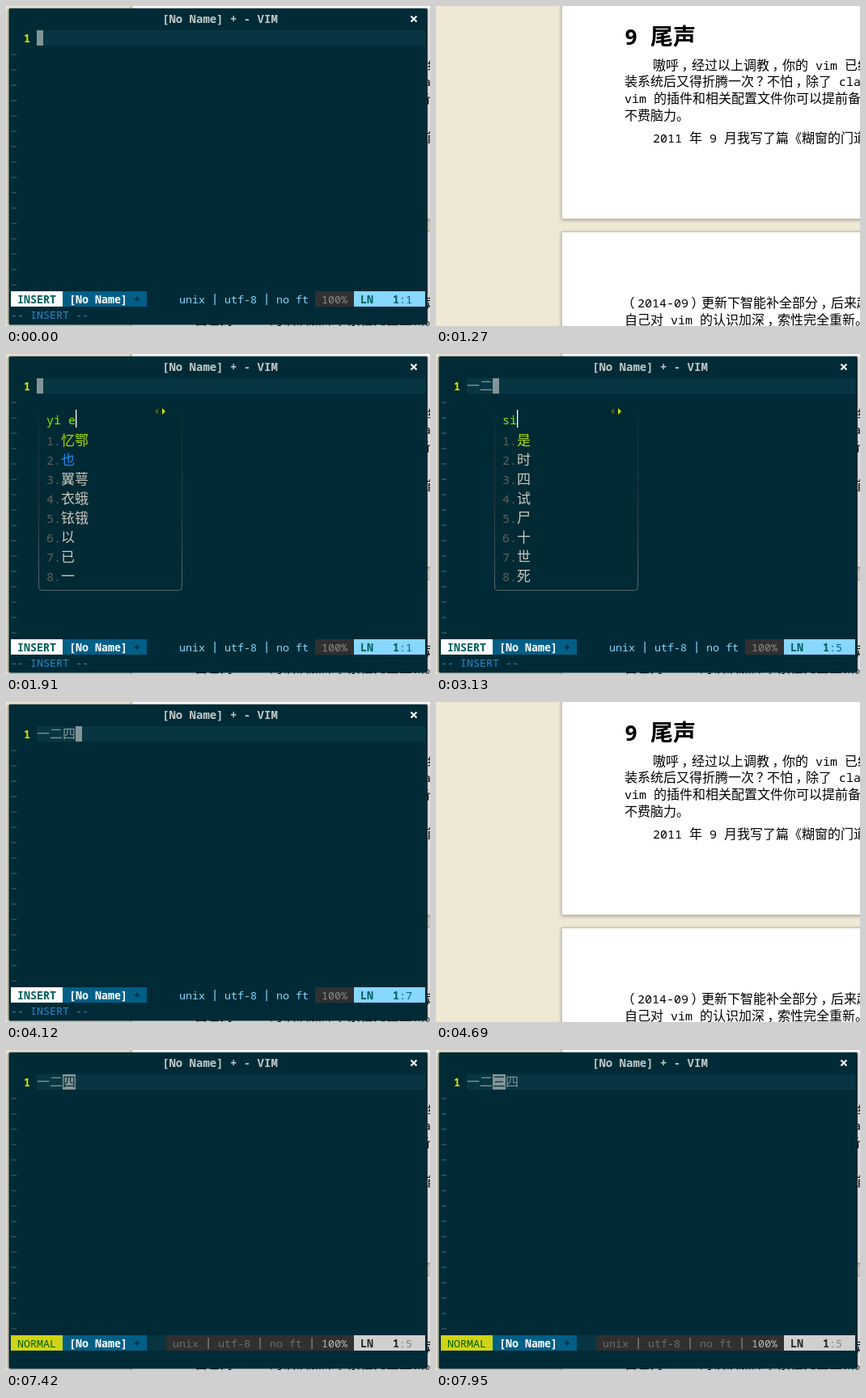
These frames come from a looping animation (524x396 px, 8000 ms). An HTML page:

```html
<!DOCTYPE html>
<html lang="zh-CN">
<head>
<meta charset="utf-8">
<title>Vim input</title>
<style>
html, body { margin: 0; width: 100%; height: 100%; overflow: hidden; background: #eee8d5; }
svg { display: block; width: 524px; height: 396px; }
text { white-space: pre; font-family: "Noto Sans Mono", "Noto Sans CJK SC", "Noto Sans CJK JP", monospace; }
.han { font-family: "Noto Sans CJK SC", "Noto Sans CJK", "Noto Sans CJK JP", sans-serif; }
</style>
</head>
<body>
<svg viewBox="0 0 524 396">
  <defs>
    <linearGradient id="edge" x1="0" y1="0" x2="0" y2="1">
      <stop offset="0" stop-color="#4b5f64" stop-opacity="0"/>
      <stop offset=".5" stop-color="#33383c" stop-opacity=".8"/>
      <stop offset="1" stop-color="#586b70"/>
    </linearGradient>
    <filter id="shade" x="-5%" y="-5%" width="110%" height="110%">
      <feDropShadow dx="0" dy="1" stdDeviation="2" flood-color="#000" flood-opacity=".3"/>
    </filter>
  </defs>
  <g id="page"></g>
  <g id="editor"></g>
</svg>
<script>
const LOOP = 8000, CELL = 8, ROW = 19, LEFT = 6, TOP = 30, TEXT_X = 38;
const BG = '#002b36', LINE = '#073642', GREY = '#839496';
const page = document.getElementById('page');
const editor = document.getElementById('editor');

const rect = (x, y, w, h, fill, more = '') =>
  `<rect x="${x}" y="${y}" width="${w}" height="${h}" fill="${fill}" ${more}/>`;

// Punctuation sits nearer the middle of its cell; offsets in em.
const NUDGE = { '，': 0.22, '？': 0.2, '（': -0.22, '）': 0.22 };

// Latin runs advance 0.6 em, Chinese runs one em.
function write(x, y, str, fill, mono, han = 16, bold = false) {
  let out = '';
  for (const run of str.match(/[\x20-\x7e]+|[，？（）]|[^\x20-\x7e，？（）]+/g) || []) {
    const wide = run.charCodeAt(0) > 126;
    const size = wide ? han : mono;
    const left = x + (NUDGE[run] || 0) * size;
    out += `<text x="${left}" y="${y}" fill="${fill}" font-size="${size}"` +
      `${wide ? ' class="han"' : ''}${bold ? ' font-weight="700"' : ''}>${run}</text>`;
    x += run.length * size * (wide ? 1 : 0.6);
  }
  return out;
}

const term = (x, y, str, fill, bold) => write(x, y, str, fill, CELL / 0.6, 16, bold);

function drawPage() {
  const sheet = (y, h) =>
    rect(155.5, y, 380, h, '#fff', 'stroke="#cdbfa6" filter="url(#shade)"');
  const lines = [
    [268, 79, '嗷呼，经过以上调教，你的 vim 已经'],
    [233, 99, '装系统后又得折腾一次？不怕，除了 clang'],
    [233, 120, 'vim 的插件和相关配置文件你可以提前备份'],
    [233, 141, '不费脑力。'],
    [268, 169, '2011 年 9 月我写了篇《糊窗的门道》'],
    [233, 373, '（2014-09）更新下智能补全部分，后来起'],
    [233, 394, '自己对 vim 的认识加深，索性完全重新。']
  ];
  page.innerHTML = rect(0, 0, 524, 396, '#eee8d5') +
    sheet(-10.5, 274) + sheet(279.5, 130) +
    write(233, 48, '9 尾声', '#000', 26.67, 28, true) +
    lines.map(([x, y, s]) => write(x, y, s, '#000', 15)).join('');
}

function drawFrame() {
  let out = rect(2.5, 3, 519.5, 392, 'none', 'rx="3" stroke="#000" stroke-opacity=".18" stroke-width="3"') +
    rect(3.5, 3, 517.5, 391.5, BG, 'rx="2"') +
    write(193, 21, '[No Name] + - VIM', '#c0c9c9', 14, 14, true) +
    '<path d="M500.5 12.5l7 7m0-7l-7 7" stroke="#f2f4f4" stroke-width="2.2"/>' +
    rect(TEXT_X, TOP, 480, ROW, LINE) +
    term(22, TOP + 15, '1', '#d7e000', true);
  for (let i = 1; i <= 16; i++) out += term(LEFT, TOP + i * ROW + 16, '~', '#586e75');
  return out;
}

function drawStatus(insert, col) {
  const y = TOP + 17 * ROW, base = y + 15;
  const info = insert ? '#87d7ff' : '#6c6c6c';
  const start = insert ? 214 : 206;
  const bar = x => rect(x + 3.5, y + 3, 1.2, 14, insert ? info : '#8a8a8a');
  let out = rect(LEFT, y, 512, ROW, LINE) +
    rect(LEFT, y, 64, ROW, insert ? '#fff' : '#d0d414') +
    term(14, base, insert ? 'INSERT' : 'NORMAL', insert ? '#005f5f' : '#005f00', insert) +
    rect(70, y, 104, ROW, '#005f87') +
    term(78, base, '[No Name]', '#fff', true) +
    term(158, base, '+', BG, true) +
    (insert ? rect(174, y, 208, ROW, BG) : rect(198, y, 184, ROW, '#303030')) +
    rect(382, y, 48, ROW, '#303030') +
    term(start, base, 'unix', info) + bar(start + 40) +
    term(start + 56, base, 'utf-8', info) + bar(start + 104) +
    term(start + 120, base, 'no ft', info) +
    term(390, base, '100%', insert ? '#8a8a8a' : '#b8b8b8') +
    rect(430, y, 88, ROW, insert ? '#87d7ff' : '#d0d0d0') +
    term(438, base, 'LN', insert ? '#005f5f' : '#262626', true) +
    term(478, base, '1', insert ? '#005f5f' : '#262626', true) +
    term(486, base, ':' + col, insert ? '#005f87' : '#808080');
  if (insert) out += term(LEFT, base + ROW, '-- INSERT --', '#268bd2');
  else out += bar(374);
  return out;
}

function drawPopup(x, typed, words, blue) {
  const caret = x + 12 + typed.length * 9;
  let out = rect(x + 2.5, 59.5, 177, 233, '#022a34', 'rx="4" stroke="url(#edge)"') +
    `<path d="M${x + 150} 67.5v7l-4-3.5z" fill="#5b6208"/>` +
    `<path d="M${x + 155} 67v8l4-4z" fill="#d8e000"/>` +
    write(x + 12, 87, typed, '#80f000', 15) +
    rect(caret, 69, 1.3, 22, '#fff');
  words.split(' ').forEach((word, i) => {
    const y = 113 + i * 24;
    const fill = i === 0 ? '#a8dc00' : i === blue ? '#1e90ff' : '#c8c8c0';
    out += write(x + 12, y, `${i + 1}.`, '#66605c', 15) +
      write(x + 30, y, word, fill, 15, 17);
  });
  return out;
}

// Each step: time, text, cursor index, then optional typed letters, candidates, blue row.
const steps = [
  { at: 0, text: '', cur: 0 },
  { at: 1270, away: true },
  { at: 1310, text: '', cur: 0 },
  { at: 1360, text: '', cur: 0, typed: 'y', words: '一 有 也 要 用 以 于 又' },
  { at: 1510, text: '', cur: 0, typed: 'yi', words: '以 也 已 一 意 亿 衣 依' },
  { at: 1860, away: true },
  { at: 1910, text: '', cur: 0, typed: 'yi e', words: '忆鄂 也 翼萼 衣蛾 铱锇 以 已 一', blue: 1 },
  { at: 1950, text: '', cur: 0, typed: 'yi er', words: '一二 也 一儿 以儿 依尔 以 已 一', blue: 1 },
  { at: 2420, text: '一二', cur: 2 },
  { at: 3030, text: '一二', cur: 2, typed: 's', words: '是 上 时 说 水 四 谁 三' },
  { at: 3130, text: '一二', cur: 2, typed: 'si', words: '是 时 四 试 尸 十 世 死' },
  { at: 4120, text: '一二四', cur: 3 },
  { at: 4640, text: '一二四', cur: 3, typed: 's', words: '是 上 时 说 水 四 谁 三' },
  { at: 4690, away: true },
  { at: 4730, text: '一二四', cur: 3, typed: 'sa', words: '撒 洒 萨 飒 卅 仨 杀 沙' },
  { at: 5140, text: '一二四', cur: 3, typed: 'san', words: '三 散 伞 山 叁 闪 善 扇' },
  { at: 5590, text: '一二四三', cur: 4 },
  { at: 6620, text: '一二四三', cur: 3, normal: true },
  { at: 7420, text: '一二四', cur: 2, normal: true },
  { at: 7910, away: true },
  { at: 7950, text: '一二三四', cur: 2, normal: true }
];

function draw(step) {
  if (step.away) return '';
  const { text, cur, normal, typed } = step;
  const x = TEXT_X + cur * 16, base = TOP + 15;
  let out = drawFrame() + term(TEXT_X, base, text, GREY) +
    rect(x, TOP, normal ? 16 : CELL, ROW, GREY);
  if (normal) out += term(x, base, text[cur], BG);
  out += drawStatus(!normal, cur * 2 + 1);
  if (typed) out += drawPopup(x, typed, step.words, step.blue);
  return out;
}

let shown = null;
const began = performance.now();

function tick() {
  const t = (performance.now() - began) % LOOP;
  const step = steps.filter(s => s.at <= t).pop();
  if (step !== shown) {
    editor.innerHTML = draw(step);
    shown = step;
  }
  requestAnimationFrame(tick);
}

drawPage();
tick();
</script>
</body>
</html>
```
